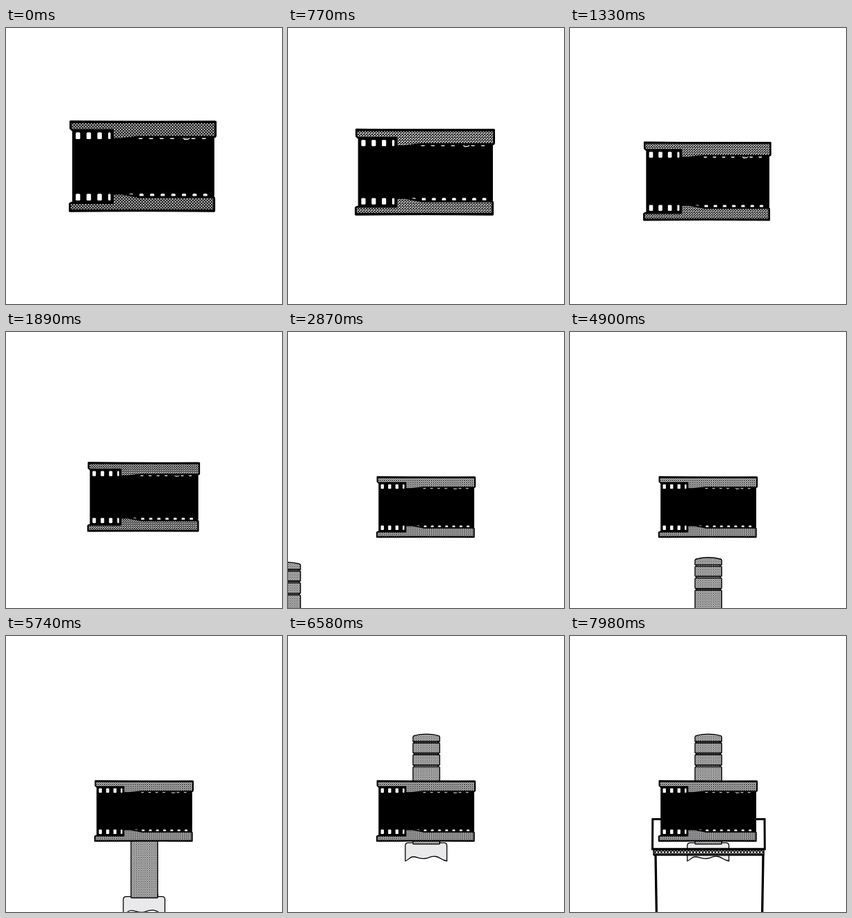
An HTML page that plays this animation: 400 px wide and 400 px high, repeating every 8 s.

```html
<!DOCTYPE html>
<html lang="en">
<head>
<meta charset="utf-8">
<title>Assembly</title>
<style>
  html, body { margin: 0; width: 100%; height: 100%; overflow: hidden; background: #fff; }
  svg { display: block; width: 100%; height: 100%; }
</style>
</head>
<body>
<svg viewBox="0 0 400 400" xmlns="http://www.w3.org/2000/svg">
  <defs>
    <pattern id="knurl" width="4.2" height="4.2" patternUnits="userSpaceOnUse">
      <rect width="4.2" height="4.2" fill="#fff"/>
      <path d="M-1 -1L5.2 5.2M-1 5.2L5.2 -1" stroke="#000" stroke-width="1.15"/>
    </pattern>
    <pattern id="fine" width="2.7" height="2.7" patternUnits="userSpaceOnUse">
      <rect width="2.7" height="2.7" fill="#fff"/>
      <path d="M-1 -1L3.7 3.7M-1 3.7L3.7 -1" stroke="#000" stroke-width=".62"/>
    </pattern>
    <pattern id="beads" x="121" y="310" width="4.6" height="7" patternUnits="userSpaceOnUse">
      <rect width="4.6" height="7" fill="#fff"/>
      <path d="M0 0L4.6 7M0 7L4.6 0" stroke="#000" stroke-width="1.3"/>
    </pattern>
  </defs>

  <g id="rod">
    <rect x="181.500" y="296" width="39" height="4" fill="#000"/>
    <path d="M170 326V304Q170 299.700 174.500 299.700H226Q230.300 299.700 230.300 304V326
      C223 325.500 221 320.500 214 319.500C206 318.500 205 322 198 322.500C190 323 188 320 181 320C176 320 175 325 170 326Z"
      fill="#e9e9eb" stroke="#000" stroke-width="1.300"/>
    <g id="segments" fill="url(#fine)" stroke="#000" stroke-width="1.400" stroke-linejoin="round">
      <path d="M181.200 153V146.500Q181.200 145 183 144.400Q200.500 139.800 218 144.400Q219.800 145 219.800 146.500V153Z"/>
    </g>
  </g>

  <g id="holder" fill="none" stroke="#000" stroke-width="3">
    <path d="M132 265.500H119.800L119.500 308.800H282.300L282 265.500H270"/>
    <rect x="121" y="310" width="160" height="7" fill="url(#beads)" stroke-width="1.500"/>
    <path d="M121 317.300H281" stroke-width="2.200"/>
    <path d="M124 317L128 560M280 317L276 560" stroke-width="3.300"/>
  </g>

  <g id="body">
    <path d="M96 147H156V158H300Q302 158 302 161V242Q302 245 300 245H156V254H96Z" fill="#000"/>
    <g id="holes" fill="#fff"></g>
    <path d="M250 158.500H256L259 161.500L264 161L267 158.500M258 159H262" fill="none" stroke="#fff" stroke-width="1.300"/>
    <g fill="url(#knurl)" stroke="#000" stroke-width="3" stroke-linejoin="round">
      <path d="M93.500 135.500Q198 137 303.700 136V155.500Q303.700 158 301 158H192L166 161H154.500V148H96L93.500 145.500Z"/>
      <path d="M92.500 265.200Q198 264 301.700 265.200V247.500Q301.700 245 299 245H194L168 240H154.500V253.500H94.500L92.500 255Z"/>
    </g>
    <path d="M93.500 136.200H303M93 264.500H301" stroke="#000" stroke-width="3.400"/>
  </g>
</svg>

<script>
const NS = 'http://www.w3.org/2000/svg';
const LOOP = 8000, STEP = 70;
const $ = id => document.getElementById(id);

function addRect(parent, x, y, width, height, rx) {
  const r = document.createElementNS(NS, 'rect');
  Object.entries({ x, y, width, height, rx }).forEach(([k, v]) => r.setAttribute(k, v));
  parent.append(r);
}

// Film perforations: tall on the open side, half covered elsewhere
for (let i = 0; i < 4; i++) {
  const w = i < 3 ? 6.5 : 3.5;
  addRect($('holes'), 101 + i * 15.7, 151.3, w, 9.7, 1.5);
  addRect($('holes'), 101 + i * 15.7, 240.2, w, 9.8, 1.5);
}
for (let i = 0; i < 8; i++) {
  if (i < 7 && i !== 4) addRect($('holes'), 192 + i * 15.3, 156, 6, 5, 1.5);
  addRect($('holes'), 178 + i * 15.4, 240, 6, 6, 1.5);
}

// Rod sections below the cap, with the necks between them
[[155, 14.5], [172, 15.3], [189.6, 112]].forEach(([y, h]) => {
  addRect($('segments'), 183, y - 2.2, 35, 2.4, 0);
  addRect($('segments'), 181.2, y, 38.6, h, .8);
});

const part = (t, from, to) => Math.min(1, Math.max(0, (t - from) / (to - from)));
const easeIn = (u, p) => u ** p;
const easeOut = (u, p) => 1 - (1 - u) ** p;
const easeBoth = (u, p) => u < .5 ? (2 * u) ** p / 2 : 1 - (2 - 2 * u) ** p / 2;

function draw(now) {
  const t = Math.floor((now % LOOP) / STEP) * STEP;

  const k = easeIn(part(t, 140, 2310), 1.5);
  const scale = 1 - .327 * k;
  $('body').setAttribute('transform',
    `translate(${198.5 + 1.7 * k} ${200.5 + 53.3 * k}) scale(${scale}) translate(-198.5 -200.5)`);

  const x = -233 * (1 - easeOut(part(t, 2730, 4550), 1.8));
  const y = 191.5 * (1 - easeBoth(part(t, 4690, 6580), 1.75));
  $('rod').setAttribute('transform', `translate(${x} ${y})`);

  const rise = easeOut(part(t, 7630, 7980), 1.15);
  $('holder').setAttribute('transform', `translate(0 ${138 * (1 - rise)})`);
}

let start;
function tick(now) {
  start ??= now;
  draw(now - start);
  requestAnimationFrame(tick);
}
draw(0);
requestAnimationFrame(tick);
</script>
</body>
</html>
```
